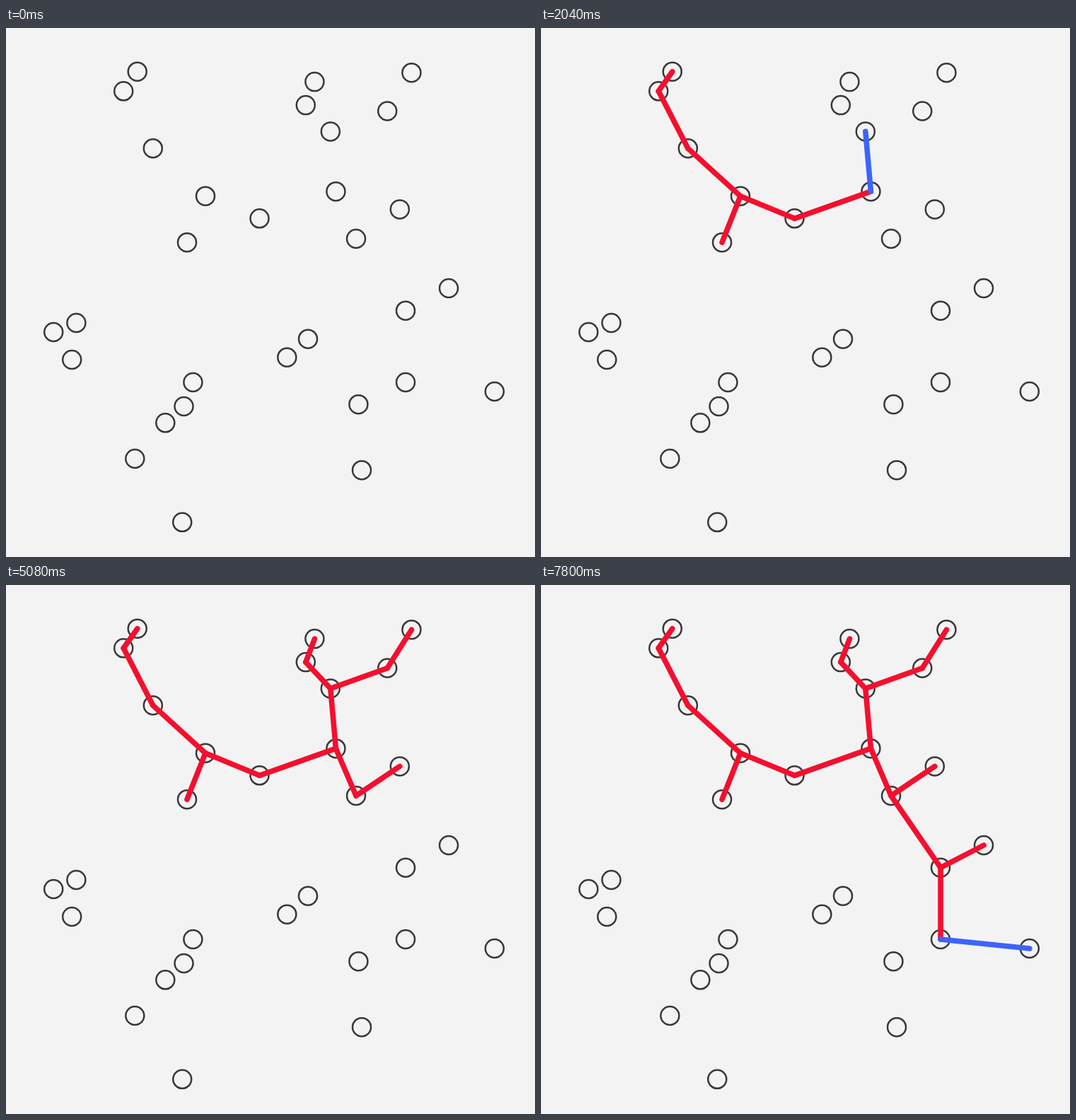
An HTML page with a canvas for the animation above (8 s loop, 748 by 748 pixels).

```html
<!DOCTYPE html>
<html lang="en">
<head>
<meta charset="utf-8">
<title>Spanning tree</title>
<style>
  html, body { margin: 0; width: 100%; height: 100%; overflow: hidden; background: #f3f3f3; }
  canvas { display: block; width: 748px; height: 748px; }
</style>
</head>
<body>
<canvas id="stage"></canvas>
<script>
const SIZE = 748, LOOP = 8000, TICK = 40;
const PAPER = '#f3f3f3', INK = '#383838', RED = '#f50f2e', BLUE = '#3d64fb';

// Node centres, in the order the tree visits them
const nodes = [
  [185.7, 61.7], [166.2, 89.3], [207.8, 170.2], [282, 237.7], [256, 303.2],
  [358.5, 269.3], [466.4, 231.2], [458.8, 146.4], [423.8, 109.1], [436.4, 76.1],
  [539.2, 117.5], [573.4, 63.2], [495, 298], [556.8, 256.4], [565, 399.7],
  [626, 368], [565, 501], [690.8, 514], [498.4, 532.2], [503, 625.2],
  [427, 439.7], [397.3, 465.7], [264.4, 501], [251.5, 535], [225.3, 558.3],
  [182.3, 609], [249.2, 698.8], [93.2, 469], [99.4, 417], [67.2, 430]
];

// Pace of the drawing: [step, time] with even steps in between
const pace = [
  [0, 80], [7, 1160], [9, 1560], [17, 2840], [19, 3320], [20, 3605],
  [26, 5375], [28, 6160], [30, 7040], [32, 7800], [33, LOOP]
];

// Prim's algorithm: the parent of every node in the minimum spanning tree
function spanningTree(points) {
  const parent = points.map(() => 0);
  const dist = (a, b) => Math.hypot(points[a][0] - points[b][0], points[a][1] - points[b][1]);
  const gap = points.map((p, i) => dist(0, i));
  const open = new Set(points.keys());
  open.delete(0);
  while (open.size) {
    const next = [...open].reduce((a, b) => gap[b] < gap[a] ? b : a);
    open.delete(next);
    for (const i of open) {
      const d = dist(next, i);
      if (d < gap[i]) {
        gap[i] = d;
        parent[i] = next;
      }
    }
  }
  return parent;
}

function stepTime(step) {
  const k = pace.findIndex(([s]) => s > step);
  const [s0, t0] = pace[k - 1], [s1, t1] = pace[k];
  const t = t0 + (t1 - t0) * (step - s0) / (s1 - s0);
  return Math.floor(t / TICK + 1e-6) * TICK;
}

const parent = spanningTree(nodes);
const steps = Array.from({ length: 33 }, (_, i) => stepTime(i));

const canvas = document.getElementById('stage');
const ctx = canvas.getContext('2d');
const ratio = window.devicePixelRatio || 1;
canvas.width = canvas.height = Math.round(SIZE * ratio);
ctx.scale(ratio, ratio);
ctx.lineCap = 'round';

function drawNode([x, y]) {
  ctx.beginPath();
  ctx.arc(x, y, 13, 0, Math.PI * 2);
  ctx.stroke();
}

function drawEdge(i, color) {
  ctx.strokeStyle = color;
  ctx.beginPath();
  ctx.moveTo(...nodes[parent[i]]);
  ctx.lineTo(...nodes[i]);
  ctx.stroke();
}

// Each edge first shows in blue, one step later it is accepted in red
function draw(time) {
  const done = steps.filter(t => t <= time).length;
  const accepted = done >> 1;

  ctx.fillStyle = PAPER;
  ctx.fillRect(0, 0, SIZE, SIZE);
  ctx.strokeStyle = INK;
  ctx.lineWidth = 2.5;
  nodes.forEach(drawNode);

  ctx.lineWidth = 7.6;
  for (let i = 1; i <= accepted; i++) drawEdge(i, RED);
  if (done % 2) drawEdge(accepted + 1, BLUE);
}

const start = performance.now();
function tick() {
  draw((performance.now() - start) % LOOP);
  requestAnimationFrame(tick);
}
tick();
</script>
</body>
</html>
```
